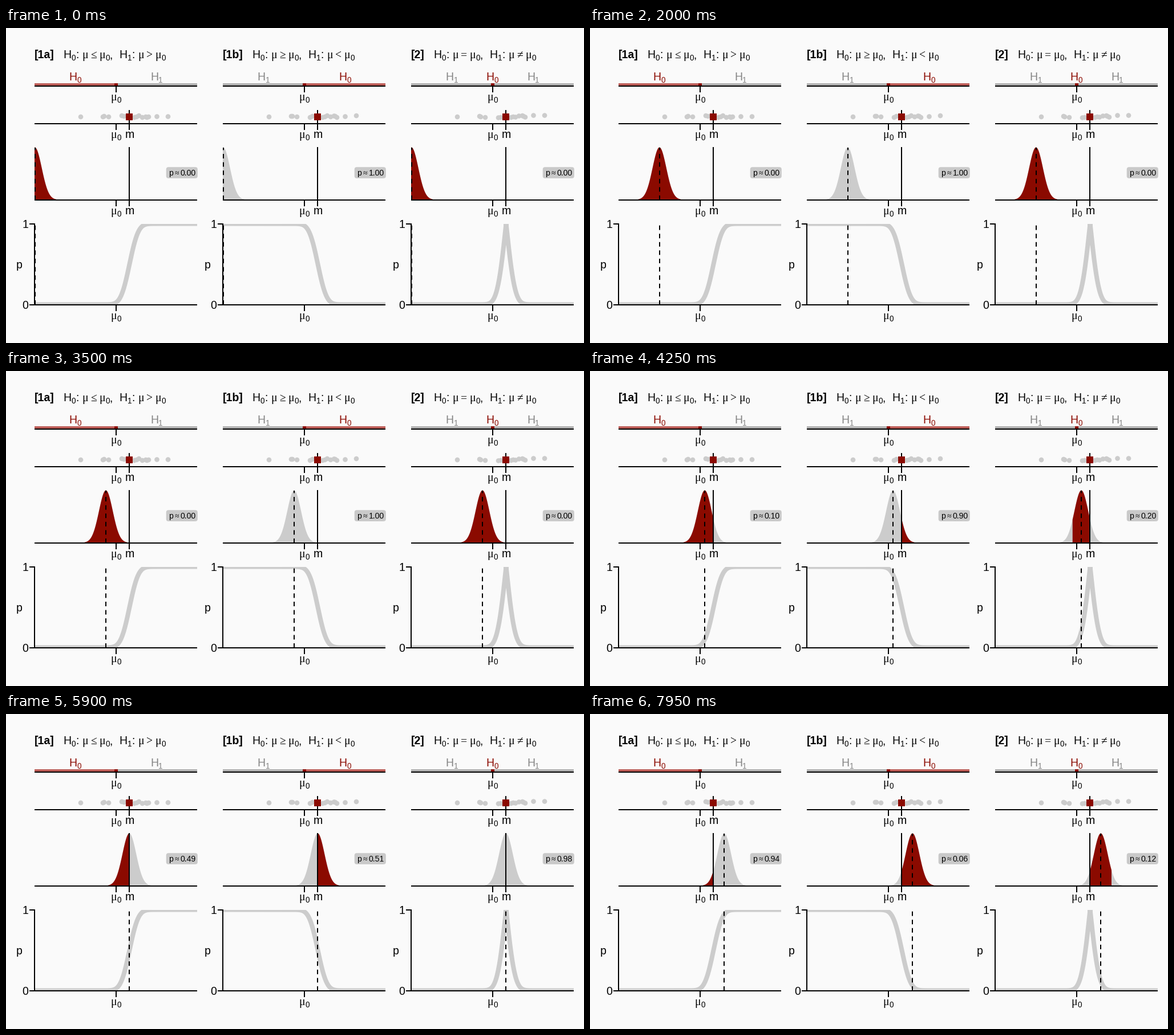
Animation, 1013 px wide and 553 px high, one loop 8 s. Source, as a matplotlib script:

```python
import math

import matplotlib.pyplot as plt
import numpy as np
from matplotlib.animation import FuncAnimation
from matplotlib.patches import Circle, FancyBboxPatch, Polygon, Rectangle

W, H, DPI = 1013, 553, 64
FRAMES, INTERVAL = 160, 50

PAPER, INK = "#fafafa", "black"
RED, PALE_RED = "#8b0a00", "#bc5c57"
GRAY, BAR_GRAY, TEXT_GRAY = "#cccccc", "#b0b0b0", "#858585"
SANS, SERIF = "Liberation Sans", "Liberation Serif"
SIZE = 19.5

# Panel geometry, in pixels relative to the first panel
LEFT, RIGHT, STEP = 50, 335.5, 330
MU0, MEAN, SIGMA = 193, 216.5, 12.05
BELL_TOP, BELL_BASE = 209.5, 301.5
P_TOP, P_BASE = 343.5, 485.5

DOT_X = [131, 170, 172, 180, 203, 207, 225, 229, 233, 239, 245, 247, 250, 264.5, 284]
DOT_Y = [
    [156, 156, 155, 156, 154, 155, 157, 156, 154, 157, 156, 157, 156, 155.5, 155.5],
    [156, 155, 155, 156, 157, 155, 157, 156, 154, 156, 154.5, 155, 157, 155.5, 154],
    [156, 155, 156, 157, 157.5, 157, 157, 156, 156.5, 154.5, 154, 155, 156.5, 153.5, 153.5],
]

fig = plt.figure(figsize=(W / DPI, H / DPI), dpi=DPI, facecolor=PAPER)
ax = fig.add_axes([0, 0, 1, 1])
ax.set_xlim(0, W)
ax.set_ylim(H, 0)
ax.axis("off")

norm_cdf = np.vectorize(lambda z: 0.5 * (1 + math.erf(z / math.sqrt(2))))


def pt(px):
    return px * 72 / DPI


def text(x, y, s, size=SIZE, font=SANS, **kw):
    return ax.text(x, y, s, fontsize=pt(size), fontfamily=font, va="baseline", **kw)


def line(xs, ys, width=2, color=INK, z=5, **kw):
    return ax.plot(xs, ys, color=color, lw=pt(width), zorder=z,
                   solid_capstyle="butt", dash_capstyle="butt", **kw)[0]


def rect(x0, y0, x1, y1, color, z=3):
    ax.add_patch(Rectangle((x0, y0), x1 - x0, y1 - y0, fc=color, lw=0, zorder=z))


def hypothesis(x, y, index, color=INK):
    text(x, y, "H", color=color)
    text(x + 14.1, y + 4, index, size=SIZE * 0.7, color=color)


def mu(x, y, sub=True):
    text(x, y, "μ", font=SERIF)
    if sub:
        text(x + 11.2, y + 4, "0", size=SIZE * 0.7)


def title(x, y, relations):
    for i, rel in enumerate(relations):
        x0 = x + 98 * i
        hypothesis(x0, y, str(i))
        text(x0 + 21.7, y, ":")
        mu(x0 + 32.5, y, sub=False)
        text(x0 + 47.7, y, rel, font=SERIF)
        mu(x0 + 62.4, y)
    text(x + 81.2, y, ",")


def axis_row(dx, y, label_y, with_mean=False):
    line([LEFT + dx, RIGHT + dx], [y, y])
    line([MU0 + dx] * 2, [y, y + 11])
    mu(MU0 + dx - 9.4, label_y)
    if with_mean:
        text(MEAN + dx, label_y, "m", ha="center")


def p_value(kind, x):
    """p-value for the null value x under each kind of test."""
    upper = norm_cdf((x - MEAN) / SIGMA)
    return [upper, 1 - upper, 2 * np.minimum(upper, 1 - upper)][kind]


def center_path():
    """Center per frame: constant speed, strongly slowed around the mean."""
    x = np.linspace(40, 260, 4001)
    when = (x - 50.6) / 1.778 + 55.3 / (1 + np.exp(-(x - 216.83) / 3.1))
    return np.interp(np.arange(FRAMES), when, x)


def bell(center, lo, hi):
    """Closed outline of the bell between lo and hi, inside the panel."""
    lo = max(lo, center - 3.1 * SIGMA, LEFT)
    hi = max(lo, min(hi, center + 3.1 * SIGMA, RIGHT))
    x = np.linspace(lo, hi, 120)
    y = BELL_BASE - (BELL_BASE - BELL_TOP) * np.exp(-((x - center) / SIGMA) ** 2 / 2)
    return np.column_stack([np.r_[lo, x, hi], np.r_[BELL_BASE, y, BELL_BASE]])


def red_range(kind, center):
    if kind == 0:
        return LEFT, MEAN
    if kind == 1:
        return MEAN, RIGHT
    reach = abs(MEAN - center)
    return center - reach, center + reach


class Panel:
    def __init__(self, kind, name, title_x, relations, labels):
        self.kind, self.dx = kind, STEP * kind
        dx = self.dx
        text(LEFT + dx, 53, name, fontweight="bold")
        title(title_x, 53, relations)
        self.draw_regions(labels)
        self.draw_sample()
        self.draw_bell()
        self.draw_curve()

    def draw_regions(self, labels):
        dx = self.dx
        for x, index in labels:
            hypothesis(x + dx - 10.8, 91.5, index, RED if index == "0" else TEXT_GRAY)
        left = PALE_RED if self.kind == 0 else BAR_GRAY
        right = PALE_RED if self.kind == 1 else BAR_GRAY
        rect(LEFT + dx, 96.5, MU0 + dx, 102, left)
        rect(MU0 + dx, 96.5, RIGHT + dx, 102, right)
        rect(MU0 - 2.7 + dx, 96.5, MU0 + 2.7 + dx, 102, RED, z=4)
        axis_row(dx, 102, 127)

    def draw_sample(self):
        dx = self.dx
        for x, y in zip(DOT_X, DOT_Y[self.kind]):
            ax.add_patch(Circle((x + dx, y), 4.3, fc=GRAY, lw=0, zorder=3))
        axis_row(dx, 168, 193, with_mean=True)
        line([MEAN + dx] * 2, [144, 179])
        rect(MEAN - 6 + dx, 150, MEAN + 6 + dx, 162, RED, z=6)

    def draw_bell(self):
        dx = self.dx
        self.gray = ax.add_patch(Polygon([[0, 0]] * 3, fc=GRAY, lw=0, zorder=2))
        self.red = ax.add_patch(Polygon([[0, 0]] * 3, fc=RED, lw=0, zorder=3))
        self.bell_mark = self.dashed(BELL_BASE, BELL_TOP)
        axis_row(dx, 301.5, 327, with_mean=True)
        line([MEAN + dx] * 2, [209, 312.5])
        ax.add_patch(FancyBboxPatch((284 + dx, 247.5), 48.5, 13, fc="#c9c9c9", lw=0,
                                    boxstyle="round,pad=3.3,rounding_size=4"))
        text(285 + dx, 259, "p", size=14)
        text(295.6 + dx, 259, "≈", size=14, font=SERIF)
        self.value = text(306 + dx, 259, "", size=14)

    def draw_curve(self):
        dx = self.dx
        x = np.linspace(LEFT - 10, RIGHT + 10, 1500)
        x = np.sort(np.append(x, MEAN))
        y = P_BASE - (P_BASE - P_TOP) * p_value(self.kind, x)
        curve = line(x + dx, y, width=8, color=GRAY, z=2)
        curve.set_clip_path(Rectangle((LEFT + dx, P_TOP), RIGHT - LEFT, P_BASE - P_TOP,
                                      transform=ax.transData))
        self.curve_mark = self.dashed(P_BASE, 346)
        axis_row(dx, P_BASE, 511)
        line([LEFT + 0.5 + dx] * 2, [P_TOP - 1, P_BASE + 1])
        for y, digit in ((P_TOP, "1"), (P_BASE, "0")):
            line([41 + dx, LEFT + 1 + dx], [y, y])
            text(39 + dx, y + 7.5, digit, ha="right")
        text(17.5 + dx, 421.5, "p")

    def dashed(self, y0, y1):
        return line([0, 0], [y0, y1], z=4, linestyle=(0, (4, 3.3)))

    def update(self, center):
        dx = self.dx
        self.gray.set_xy(bell(center, LEFT, RIGHT) + [dx, 0])
        self.red.set_xy(bell(center, *red_range(self.kind, center)) + [dx, 0])
        for mark in (self.bell_mark, self.curve_mark):
            mark.set_xdata([center + dx] * 2)
        self.value.set_text(f"{float(p_value(self.kind, center)):.2f}")
        return [self.gray, self.red, self.bell_mark, self.curve_mark, self.value]


panels = [
    Panel(0, "[1a]", 100.5, "≤>", [(121.5, "0"), (264, "1")]),
    Panel(1, "[1b]", 431.5, "≥<", [(121.5, "1"), (264, "0")]),
    Panel(2, "[2]", 749.5, "=≠", [(121.5, "1"), (192.5, "0"), (264, "1")]),
]
centers = center_path()


def draw(frame):
    return [artist for panel in panels for artist in panel.update(centers[frame])]


anim = FuncAnimation(fig, draw, frames=FRAMES, interval=INTERVAL, repeat=True,
                     repeat_delay=0, blit=False)
plt.show()
```
